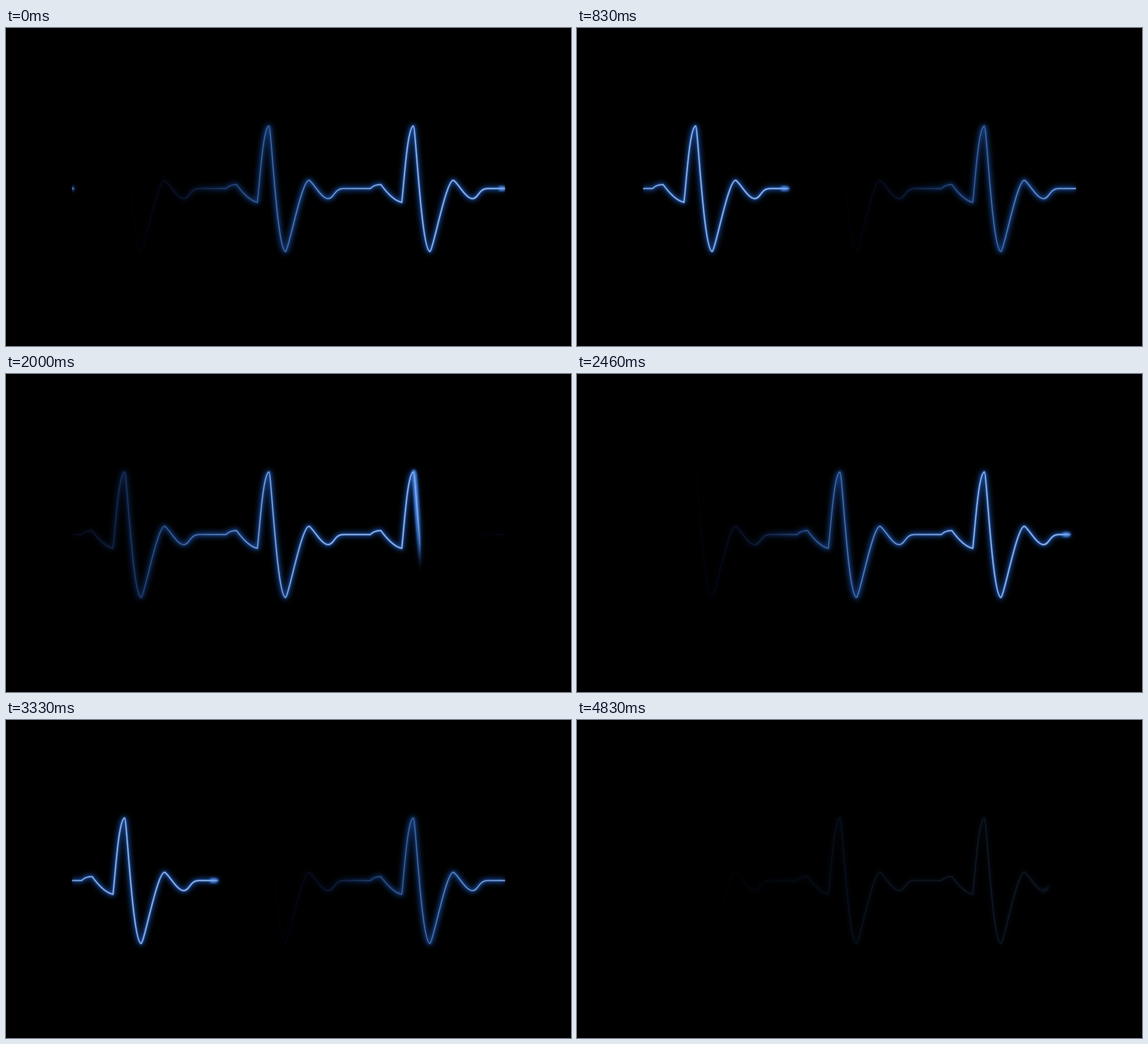
These frames come from a looping animation (920 px wide and 518 px high, 4870 ms). An HTML page:

```html
<!DOCTYPE html>
<html lang="en">
<head>
<meta charset="utf-8">
<title>Pulse line</title>
<style>
  html, body { margin: 0; width: 100%; height: 100%; overflow: hidden; background: #000; }
  svg { display: block; width: 100vw; height: 100vh; }
  path { fill: none; stroke-linejoin: round; }
</style>
</head>
<body>
<svg viewBox="0 0 920 518">
  <defs>
    <clipPath id="window"><rect x="107.5" y="100" width="705.5" height="320"/></clipPath>
    <filter id="soft" filterUnits="userSpaceOnUse" x="60" y="100" width="800" height="320" color-interpolation-filters="sRGB">
      <feGaussianBlur stdDeviation="4.2"/>
    </filter>
    <filter id="near" filterUnits="userSpaceOnUse" x="60" y="100" width="800" height="320" color-interpolation-filters="sRGB">
      <feGaussianBlur stdDeviation="1.7"/>
    </filter>
  </defs>
  <g clip-path="url(#window)"><g id="scene"></g></g>
</svg>
<script>
const NS = 'http://www.w3.org/2000/svg';
const LOOP = 4870, FRAME = 1000 / 24;
const SPAN = 705.5, SWEEP = 2500, START = 110.5;
const scene = document.getElementById('scene');
const defs = document.querySelector('defs');

// One heartbeat, relative to its left end; y is on the stage.
const BEAT = [
  [16, 261.5],
  [20, 257, 26, 255, 33, 255],
  [41, 266, 53, 281, 67, 284],
  [71, 250, 76, 162, 86, 159.5],
  [89.5, 159.5, 99, 364, 113, 364],
  [118, 362, 139, 248, 151, 248],
  [157, 250, 171, 278, 182, 278],
  [192, 278, 192, 261.5, 207, 261.5],
  [235.2, 261.5]
];

function beatPath(x0) {
  return BEAT.map(p => (p.length > 2 ? 'C' : 'L') +
    p.map((v, i) => i % 2 ? v : v + x0).join(' ')).join('');
}
const line = 'M107 261.5' + [0, 1, 2].map(i => beatPath(107.2 + i * 235.1)).join('');

function make(tag, attrs, parent) {
  const el = document.createElementNS(NS, tag);
  for (const k in attrs) el.setAttribute(k, attrs[k]);
  return parent.appendChild(el);
}

// Each stop: distance behind the head, colour, opacity.
function layer(id, width, filter, stops) {
  const grad = make('linearGradient', {
    id, gradientUnits: 'userSpaceOnUse', spreadMethod: 'repeat', y1: 0, y2: 0
  }, defs);
  for (const [age, color, alpha] of stops)
    make('stop', { offset: age / SPAN, 'stop-color': color, 'stop-opacity': alpha }, grad);
  const holder = make('g', filter ? { filter: `url(#${filter})` } : {}, scene);
  make('path', { d: line, stroke: `url(#${id})`, 'stroke-width': width }, holder);
  return grad;
}

const GLOW = '#1c55b4';
const layers = [
  layer('halo', 6.5, 'soft', [
    [0, GLOW, .8], [340, GLOW, .8], [420, GLOW, .6], [480, GLOW, .38],
    [530, '#18347c', .2], [580, '#141c50', .11], [645, '#0c0c28', 0]
  ]),
  layer('rim', 4, 'near', [
    [0, '#2b66c4', .6], [260, '#2b66c4', .5], [420, '#24559f', .32],
    [520, '#1c3878', .14], [640, '#101038', 0]
  ]),
  layer('head', 8.5, 'near', [
    [0, '#4a8cf0', .15], [4, '#4a8cf0', .65], [7, '#4a8cf0', .9],
    [11, '#4a8cf0', .75], [16, '#4a8cf0', 0]
  ]),
  layer('body', 2.5, '', [
    [0, '#84aae6', .1], [4, '#84aae6', .5], [16, '#84aae6', .8],
    [160, '#84aae6', .75], [250, '#759dda', .35], [350, '#5f8ccc', 0]
  ]),
  layer('core', 1.5, '', [
    [0, '#8cb0e8', .2], [5, '#8cb0e8', .7], [16, '#8cb0e8', .9],
    [240, '#8cb0e8', .88], [350, '#7aa3dc', .68], [440, '#5583c4', .45],
    [510, '#344f94', .24], [565, '#20285c', .12], [640, '#101030', 0]
  ])
];

function draw(time) {
  const step = Math.floor((time % LOOP + 5) / FRAME);
  const head = START + step * FRAME / SWEEP * SPAN % SPAN;
  for (const g of layers) {
    g.setAttribute('x1', head);
    g.setAttribute('x2', head - SPAN);
  }
  scene.setAttribute('opacity', Math.min(1, (119 - step) / 26));
}

const begin = performance.now();
function tick() {
  draw(performance.now() - begin);
  requestAnimationFrame(tick);
}
draw(0);
requestAnimationFrame(tick);
</script>
</body>
</html>
```
